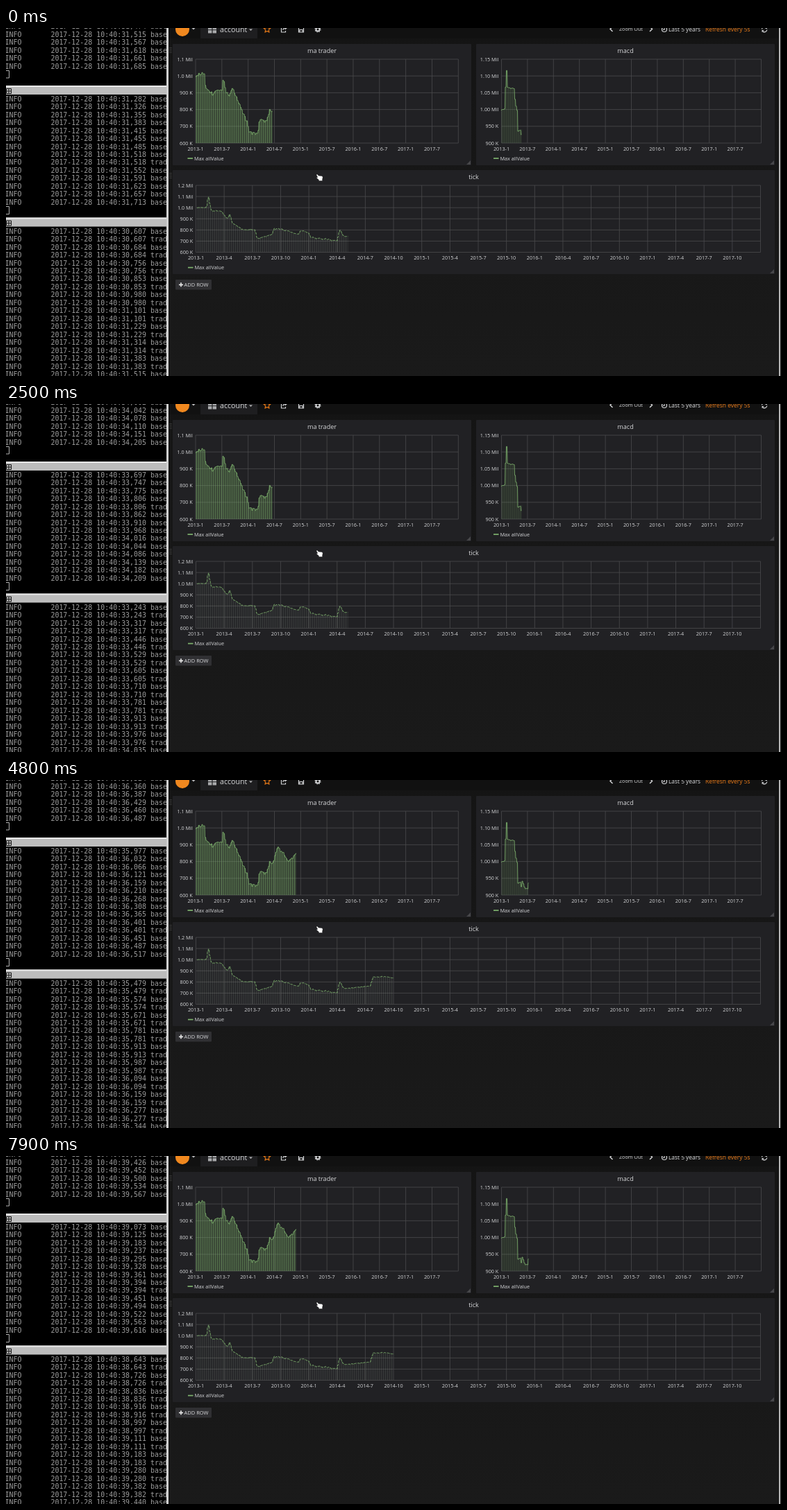
Recreate the animation shown at these times as an HTML page. Size 1116x502 px, loop 8 s.

```html
<!DOCTYPE html>
<html lang="en">
<head>
<meta charset="utf-8">
<title>Account dashboard</title>
<style>
  html, body { margin: 0; width: 100%; height: 100%; overflow: hidden; background: #161616; }
  svg { display: block; width: 1116px; height: 502px; font-family: "Open Sans", sans-serif; fill: #d5d6d8; }
  #logs text { font: 9.95px "DejaVu Sans Mono", monospace; fill: #9c9c9c; white-space: pre; }
  .axis { font-size: 7.25px; }
  .title { font-size: 9.1px; font-weight: 500; text-anchor: middle; }
  .end { text-anchor: end; }
  .mid { text-anchor: middle; }
  .icon { fill: none; stroke: #d0d1d3; stroke-width: 1.2; }
</style>
</head>
<body>
<svg viewBox="0 0 1116 502">
  <defs>
    <linearGradient id="page" x2="0" y2="1"><stop stop-color="#141414"/><stop offset="1" stop-color="#1a1a1a"/></linearGradient>
  </defs>
  <rect width="232" height="502" fill="#000"/>
  <g id="logs"></g>
  <g id="bars"></g>
  <path d="M-2 61.5H4.5V72H-2M-2 257.500H4.5V268.5H-2" fill="none" stroke="#b0b0b0"/>

  <rect x="231" width="3" height="502" fill="#d0d0d0"/>
  <rect x="234" width="882" height="502" fill="url(#page)"/>
  <rect x="1113" width="2" height="502" fill="#b8b8b8"/>

  <rect x="234" width="879" height="15" fill="#111"/>
  <rect x="280" width="82" height="15" fill="#1e1e20"/>
  <circle cx="254" cy="2" r="10" fill="#f0881f"/>
  <path d="M267.5 0h5l-2.5 2.6zM350 1.5h5l-2.5 2.6z" fill="#b8b9bb"/>
  <path d="M291 0h5.4v2.2h-5.4zM297.6 0h5.4v2.2h-5.4zM291 3.3h5.4v4.2h-5.4zM297.6 3.3h5.4v4.2h-5.4z" fill="#a9aaac"/>
  <text x="308" y="5.8" font-size="10.6">account</text>
  <path d="M376 -3l1.4 3 3.3.4-2.4 2.3.6 3.3-2.9-1.6-2.9 1.6.6-3.3-2.4-2.3 3.3-.4z" fill="none" stroke="#eb7b18" stroke-width="1.1"/>
  <g class="icon">
    <path d="M399 -1h-2.5v7h6V4M399 3c0-2 1-3 4-3M401.5 -2l2.5 2-2.5 2"/>
    <path d="M421.5 -2h7v8h-7zM423 6V2.5h4V6"/>
    <circle cx="449" cy="2" r="2.5" stroke-width="2"/>
    <circle cx="449" cy="2" r="3.9" stroke-dasharray="1.5 1.56"/>
    <path d="M873.5 -2l-3.5 3.5 3.5 3.5M927 -2l3.5 3.5-3.5 3.5" stroke-width="1.5"/>
    <circle cx="948" cy="2" r="3.5"/><path d="M948 0v2.5h-2"/>
    <path d="M1088.5 1.5a3.7 3.7 0 0 1 6.5-2M1095.8 2.5a3.7 3.7 0 0 1-6.5 2"/>
    <path d="M1096-2v3h-3zM1088.5 6V3h3z" fill="#d0d1d3" stroke="none"/>
  </g>
  <text x="883" y="3.8" font-size="7.2">Zoom Out</text>
  <text x="954" y="5" font-size="8.4">Last 5 years</text>
  <text x="1007" y="5" font-size="8.45" fill="#eb7b18">Refresh every 5s</text>
  <path d="M236 28v8M238 28v8M236 209v8M238 209v8" stroke="#555" stroke-dasharray="1 1.3"/>

  <g id="panels"></g>

  <rect x="244" y="363" width="52" height="14.5" rx="1" fill="#303033"/>
  <path d="M249 370.3h6M252 367.3v6" stroke="#e3e3e3" stroke-width="1.7"/>
  <text x="256.5" y="373" font-size="7.5">ADD ROW</text>

  <circle id="spinner" cx="1101" cy="210.5" r="3.3" fill="none" stroke="#c8c9cb" stroke-width="1.6" stroke-dasharray="1.3 1.292"/>
  <path d="M447 212q0-1.300 1.600-.7l1.400 1.700 4.800.6q1.400.3 1.400 2l-.6 2.700v2.200h-5.200v-1.500l-3-2.600q-.2-1.500 1.400-1z" fill="#fff" stroke="#111" stroke-width=".4"/>
</svg>
<script>
const LOOP = 8000, STEP = 100, PITCH = 11.46;
const $ = id => document.getElementById(id);

function el(parent, tag, attrs, text) {
  const node = document.createElementNS("http://www.w3.org/2000/svg", tag);
  for (const k in attrs) node.setAttribute(k, attrs[k]);
  if (text) node.textContent = text;
  return parent.appendChild(node);
}

let seed = 17;
const rand = () => (seed = seed * 16807 % 2147483647) / 2147483647;

// Terminal title bars
for (const y of [83, 273.5]) {
  const g = $("bars");
  el(g, "rect", { y, width: 231, height: 13, fill: "#bdbdbd" });
  el(g, "rect", { y, width: 231, height: 2, fill: "#e8e8e8" });
  el(g, "path", { d: `M.5 ${y + 4.5}h7v7h-7zM.5 ${y + 8}h7M4 ${y + 4.5}v7`, fill: "none", stroke: "#111" });
}

// Logs: lines arrive at random gaps; a trade line shares the time of the line above it.
// "start" is the newest time at the start of the loop, in ms after 10:40:00.
const logs = [
  { y: 1.2, rows: 6, gap: 40, start: 31705, trades: 0 },
  { y: 105.8, rows: 14, gap: 42, start: 31726, trades: .08 },
  { y: 296.7, rows: 20, gap: 95, start: 31600, trades: 1 }
];

for (const log of logs) {
  log.lines = [];
  let t = log.start - log.rows * log.gap * 1.5;
  while (t < log.start + LOOP) {
    log.lines.push({ t, kind: "base" });
    if (rand() < log.trades) log.lines.push({ t, kind: "trad" });
    t += Math.round(log.gap * (.6 + .8 * rand()));
  }
  log.nodes = Array.from({ length: log.rows }, (_, i) =>
    el($("logs"), "text", { x: -1.4, y: log.y + i * PITCH }));
}

function drawLog(log, t) {
  const shown = log.lines.filter(line => line.t <= log.start + t).slice(-log.rows);
  log.nodes.forEach((node, i) => {
    const { t, kind } = shown[i], clock = (t / 1000).toFixed(3).replace(".", ",");
    node.textContent = `INFO       2017-12-28 10:40:${clock} ${kind}`;
  });
}

// Charts: key points "x,y" of each curve, roughened by weekly noise
const dates = (n, perYear) => Array.from({ length: n }, (_, i) =>
  `${2013 + Math.floor(i / perYear)}-${1 + i % perYear * 12 / perYear}`);
const scale = (top, step, digits) => Array.from({ length: 9 }, (_, i) => top - i * step)
  .filter(v => v > 590 && (digits < 2 || v >= 900))
  .map(v => v < 1000 ? `${v} K` : `${(v / 1000).toFixed(digits)} Mil`);

const charts = [
  { title: "ma trader", box: [240, 23, 430, 175], plot: [273, 45, 651.3, 166], xs: dates(10, 2), ys: scale(1100, 100, 1),
    ends: [383.5, 418.5], at: 3800, area: .16, bar: .45, noise: 7,
    keys: "273,69 285,66 286,85 297,97 302,90 311,90 312.5,68 316,93 322,99 325,86 334,107 347,135 349,149 362,152 365,132 376,134 380,115 383,122 391,96 400,108 406,118 419,104" },
  { title: "macd", box: [677, 23, 430, 175], plot: [713.5, 45, 1087.5, 166], xs: dates(10, 2), ys: scale(1150, 50, 2),
    ends: [742.3, 752.5], at: 3800, area: .1, bar: .1, noise: 2,
    keys: "713,117.5 718,117.5 720,53 722,86 731,87 733,108 736,122 737,149 741,146 742,162 743,146 747,157 751,157 753,140" },
  { title: "tick", box: [240, 205, 867, 150], plot: [273.5, 227, 1086.5, 323.5], xs: dates(20, 4), ys: scale(1200, 100, 1),
    ends: [492.5, 558.5], at: 4000, area: 0, bar: .17, noise: 2.5, dash: "4 1.5",
    keys: "275,259 288,259 291,241 295,264 309,264 318,275 322,268 325,281 341,291 358,291 361,304 382,298 386,289 404,292 420,298 424,292 435,295 438,302 476,307 480,291 486,301 524,297 528,284 548,284 559,286" }
];

function valueAt(keys, x) {
  const i = Math.max(1, keys.findIndex(p => p[0] >= x));
  const [ax, ay] = keys[i - 1], [bx, by] = keys[i];
  return ay + (by - ay) * (x - ax) / (bx - ax);
}

function drawPlot(g, c, green) {
  const [left, , , bottom] = c.plot, week = 1.5;
  const keys = c.keys.split(" ").map(p => p.split(",").map(Number));
  let line = "", bars = "";
  for (let i = 0, x = keys[0][0]; x < c.ends[1]; i++, x += week) {
    const rough = i % 3 ? 0 : (rand() - .5) * c.noise;
    const y = (valueAt(keys, x) + rough).toFixed(1);
    line += `${i ? "L" : "M"}${x} ${y}h${week * .7}`;
    if (i % 2) bars += `M${x} ${y}V${bottom}`;
  }
  el(g, "path", { d: `${line}V${bottom}H${left}z`, fill: green, stroke: "none", opacity: c.area });
  el(g, "path", { d: bars, opacity: c.bar, "stroke-width": 1.6, stroke: c.dash ? "#a3b2a0" : green });
  el(g, "path", { d: line, "stroke-width": .85, "stroke-dasharray": c.dash || "none" });
}

charts.forEach((c, id) => {
  const g = $("panels"), [x, y, w, h] = c.box, [left, top, right, bottom] = c.plot;
  const dx = (right - left) / c.xs.length, dy = (bottom - top) / (c.ys.length - 1);
  const green = "#7eb26d", legendY = bottom + 22;
  el(g, "rect", { x, y, width: w, height: h, rx: 1, fill: "#212124" });
  el(g, "path", { d: `M${x + w - 1} ${y + h - 7}v6h-6z`, fill: "#47474a" });
  el(g, "text", { x: x + w / 2, y: y + 13.3, class: "title" }, c.title);

  let grid = `M${right} ${top}V${bottom}`;
  c.ys.forEach((label, i) => {
    grid += `M${left} ${top + i * dy}H${right}`;
    el(g, "text", { x: left - 4.2, y: top + i * dy + 2.6, class: "axis end" }, label);
  });
  c.xs.forEach((label, i) => {
    grid += `M${left + i * dx} ${top}V${bottom}`;
    el(g, "text", { x: left + i * dx, y: bottom + 10.8, class: "axis mid" }, label);
  });
  el(g, "path", { d: grid, fill: "none", stroke: "#4b4b4d", "stroke-width": .8 });

  const clip = el(g, "clipPath", { id: "clip" + id });
  c.clip = el(clip, "rect", { x: left - 1, y: top, height: bottom - top });
  drawPlot(el(g, "g", { "clip-path": `url(#clip${id})`, fill: "none", stroke: green }), c, green);

  el(g, "rect", { x: left - 11.5, y: legendY - .8, width: 7.5, height: 1.7, fill: green });
  el(g, "text", { x: left - 2, y: legendY + 2.7, class: "axis" }, "Max allValue");
});

let shownStep = -1;
function frame() {
  const t = Math.floor(performance.now() % LOOP / STEP) * STEP;
  if (t !== shownStep) {
    shownStep = t;
    logs.forEach(log => drawLog(log, t));
    charts.forEach(c => c.clip.setAttribute("width", c.ends[+(t >= c.at)] - c.plot[0] + 1));
    const spinner = $("spinner");
    spinner.setAttribute("visibility", t >= 3800 && t < 4000 ? "visible" : "hidden");
    spinner.setAttribute("transform", `rotate(${t * .18} 1101 210.5)`);
  }
  requestAnimationFrame(frame);
}
frame();
</script>
</body>
</html>
```
